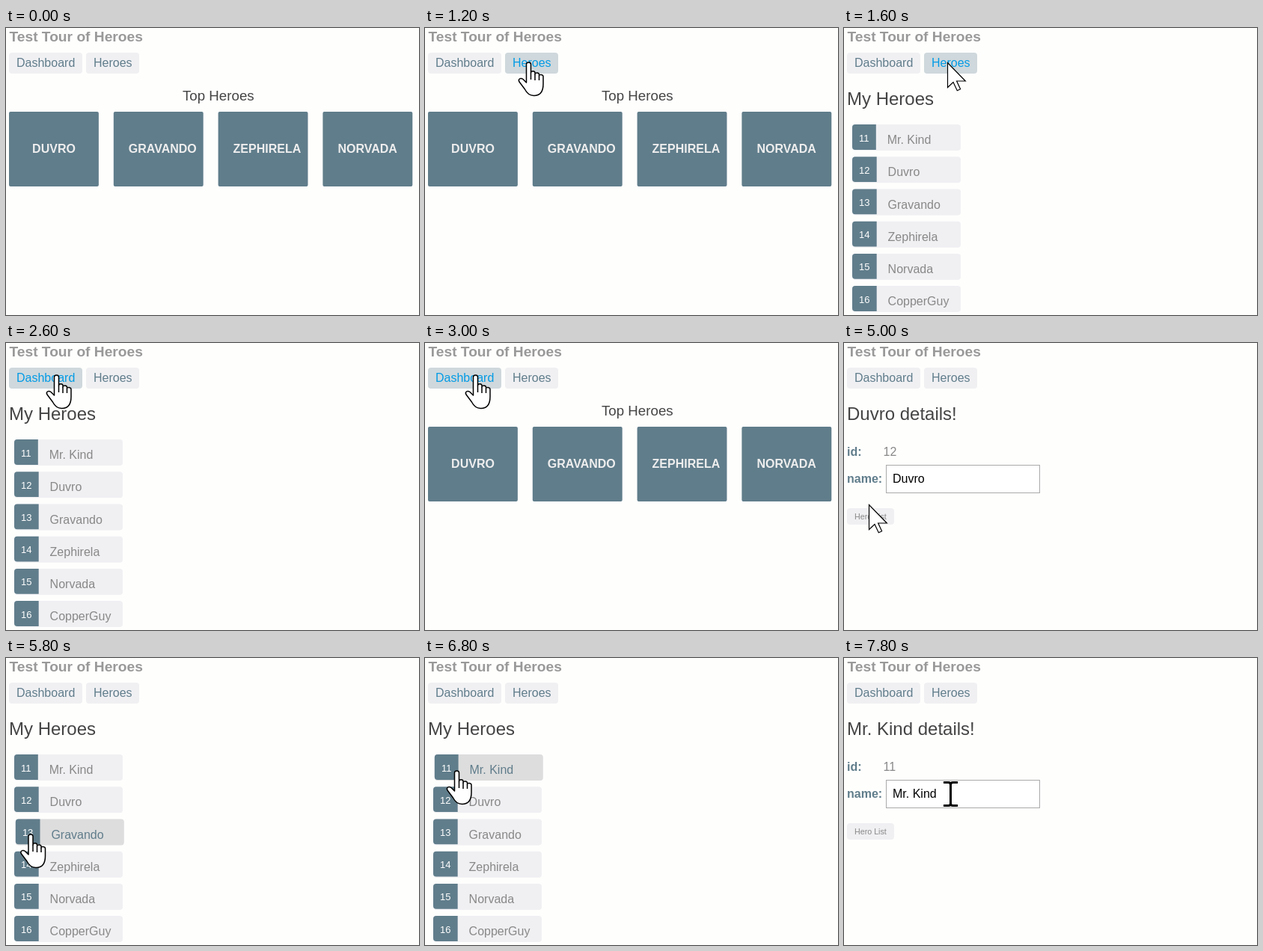
These frames come from a looping animation (552x384 px, 8 s). An HTML page:

```html
<!DOCTYPE html>
<html lang="en">
<head>
<meta charset="utf-8">
<title>Test Tour of Heroes</title>
<style>
  html, body { margin: 0; width: 100%; height: 100%; overflow: hidden; background: #fefefd; }
  svg { display: block; width: 552px; height: 384px; font: 16px "Liberation Sans", Arial, sans-serif; }
  .view, .cursor { display: none; }
  .shown { display: inline; }
  .bold { font-weight: bold; }
  .title { font-size: 19.2px; font-weight: bold; fill: #999; }
  .h2 { font-size: 24px; fill: #444; }
  .h3 { font-size: 18.72px; fill: #444; }
  .slate { fill: #607d8b; }
  .grey { fill: #888; }
  .box { fill: #f0f0f3; }
  .nav text { fill: #607d8b; }
  .nav.on .box, .back.on .box { fill: #cfd8dc; }
  .nav.on text { fill: #039be5; }
  .back text { font-size: 10.7px; fill: #888; }
  .card rect { fill: #607d8b; }
  .card text { fill: #eee; font-weight: bold; }
  .card.on rect { fill: #f0f0f3; }
  .card.on text { fill: #607d8b; }
  .row .label { fill: #888; }
  .row .id { font-size: 13px; fill: #fff; }
  .row.on { transform: translateX(1.8px); }
  .row.on .box { fill: #ddd; }
  .row.on .label { fill: #607d8b; }
  .field { fill: #fff; stroke: #aaa; }
</style>
</head>
<body>
<svg id="stage" viewBox="0 0 552 384"></svg>
<script>
const LOOP = 8000;
const heroes = ["Mr. Kind", "Duvro", "Gravando", "Zephirela", "Norvada", "CopperGuy"]
  .map((name, i) => ({ id: 11 + i, name }));

const text = (x, y, cls, s, extra = "") => `<text x="${x}" y="${y}" class="${cls}" ${extra}>${s}</text>`;
const rect = (x, y, w, h, r, cls) =>
  `<rect x="${x}" y="${y}" width="${w}" height="${h}" rx="${r}" class="${cls}"/>`;
const group = (cls, id, body) => `<g class="${cls}" id="${id}">${body}</g>`;

const nav = (id, label, x, w) =>
  group("nav", id, rect(x, 33, w, 28, 4, "box") + text(x + 10, 52.3, "", label));

function card(hero, i) {
  const x = 4 + 139.8 * i;
  const name = hero.name.toUpperCase();
  const label = i ? text(x + 20, 167, "", name) : text(x + 60, 167, "", name, 'text-anchor="middle"');
  return group("card", "card" + hero.id, rect(x, 112, 119.9, 100, 2, "") + label);
}

function row(hero, i) {
  const y = 129.1 + 43.2 * i;
  const w = i ? 32.7 : 31.8;
  const badge = `<path class="slate" d="M${11 + w} ${y}v33.8H15a4 4 0 0 1-4-4V${y + 4}a4 4 0 0 1 4-4z"/>`;
  return group("row", "row" + hero.id,
    rect(11, y, 145, 35, 4, "box") + badge +
    text(20.1, y + 22.4, "id", hero.id) +
    text(25.9 + w, y + 26, "label", hero.name));
}

const detail = hero => group("view", "detail" + hero.id,
  text(4, 103, "h2", hero.name + " details!") +
  text(4, 151, "bold slate", "id:") + text(52.5, 151, "grey", hero.id) +
  text(4, 187, "bold slate", "name:") +
  rect(56.5, 163.5, 205, 37, 0, "field") + text(65, 187, "", hero.name) +
  group("back", "back" + hero.id, rect(4, 221, 63, 22, 4, "box") + text(14, 236, "", "Hero List")));

// Each cursor is drawn with its hot spot at the origin.
const cursors = {
  arrow: `<path fill="#fff" stroke="#000" stroke-width="1.2"
    d="M.5 .5V33.5L8 26.5L13.3 37.7L17.6 35.8L12.6 25H24.3Z"/>`,
  hand: `<g transform="translate(-13.5 0)" stroke="#000" stroke-width="1.5" stroke-linejoin="round">
    <path fill="#fff" d="M11 3.5C11 0 17 0 17 3.5V15C17 12 22.5 12 22.5 15V17C22.5 14 28 14.5 28 17V19
      C28 16.5 33.5 17 33.5 20V30C33.5 40 29 45.5 21 45.5C14 45.5 11 41 9 37L1.5 27
      C-.5 23.5 3 21 6.5 23.5L11 28Z"/>
    <path fill="none" d="M17 15V24M22.5 17V25M28 19V25"/></g>`,
  beam: `<path fill="none" stroke="#000" stroke-width="3"
    d="M-9.5 -15.5H-3Q0 -15.5 0 -12.5V12.5Q0 15.5 -3 15.5H-9.5
       M9.5 -15.5H3Q0 -15.5 0 -12.5M0 12.5Q0 15.5 3 15.5H9.5"/>`
};

const stage = document.getElementById("stage");
stage.innerHTML =
  text(4.5, 18, "title", "Test Tour of Heroes") +
  nav("dashboard", "Dashboard", 4, 98) + nav("heroes", "Heroes", 107, 71) +
  group("view", "top", text(236, 97, "h3", "Top Heroes") + heroes.slice(1, 5).map(card).join("")) +
  group("view", "list", text(4, 103, "h2", "My Heroes") + heroes.map(row).join("")) +
  detail(heroes[0]) + detail(heroes[1]) +
  Object.entries(cursors).map(([id, body]) => group("cursor", id, body)).join("");

// start ms, view, cursor, x, y, hovered part
const steps = [
  [0, "top"],
  [200, "top", "arrow", 365, 122],
  [600, "top", "arrow", 318, 104],
  [800, "top", "arrow", 235, 74],
  [1000, "top", "hand", 162, 50, "heroes"],
  [1200, "top", "hand", 138, 45, "heroes"],
  [1600, "list", "arrow", 138, 46, "heroes"],
  [1800, "list", "hand", 138, 45, "heroes"],
  [2200, "list", "hand", 120, 45, "heroes"],
  [2400, "list", "hand", 86, 43, "dashboard"],
  [2600, "list", "hand", 67, 42, "dashboard"],
  [3000, "top", "hand", 67, 42, "dashboard"],
  [3200, "top", "hand", 64, 53, "dashboard"],
  [3400, "top", "arrow", 56, 94],
  [3600, "top", "hand", 48, 138, "card12"],
  [3800, "top", "hand", 44.5, 154, "card12"],
  [4200, "detail12", "arrow", 44, 156],
  [4600, "detail12", "arrow", 42, 170],
  [4800, "detail12", "arrow", 37, 196],
  [5000, "detail12", "arrow", 33, 216],
  [5200, "detail12", "hand", 32.5, 231, "back12"],
  [5400, "detail12", "hand", 32.5, 235, "back12"],
  [5600, "list", "arrow", 32, 236, "row13"],
  [5800, "list", "hand", 32.5, 235, "row13"],
  [6400, "list", "hand", 34, 214, "row13"],
  [6600, "list", "hand", 38, 180, "row12"],
  [6800, "list", "hand", 42, 150, "row11"],
  [7000, "detail11", "arrow", 42, 150],
  [7200, "detail11", "arrow", 75, 157],
  [7400, "detail11", "beam", 118, 170],
  [7600, "detail11", "beam", 134, 178],
  [7800, "detail11", "beam", 142.5, 182]
];

const mark = (selector, cls, id) =>
  stage.querySelectorAll(selector).forEach(el => el.classList.toggle(cls, el.id === id));

let current;
function draw() {
  const time = performance.now() % LOOP;
  const step = steps.findLast(([start]) => start <= time);
  if (step !== current) {
    current = step;
    const [, view, cursor, x, y, hovered] = step;
    mark(".view", "shown", view);
    mark(".cursor", "shown", cursor);
    mark(".nav, .card, .row, .back", "on", hovered);
    if (cursor) document.getElementById(cursor).setAttribute("transform", `translate(${x} ${y})`);
  }
  requestAnimationFrame(draw);
}
draw();
</script>
</body>
</html>
```
